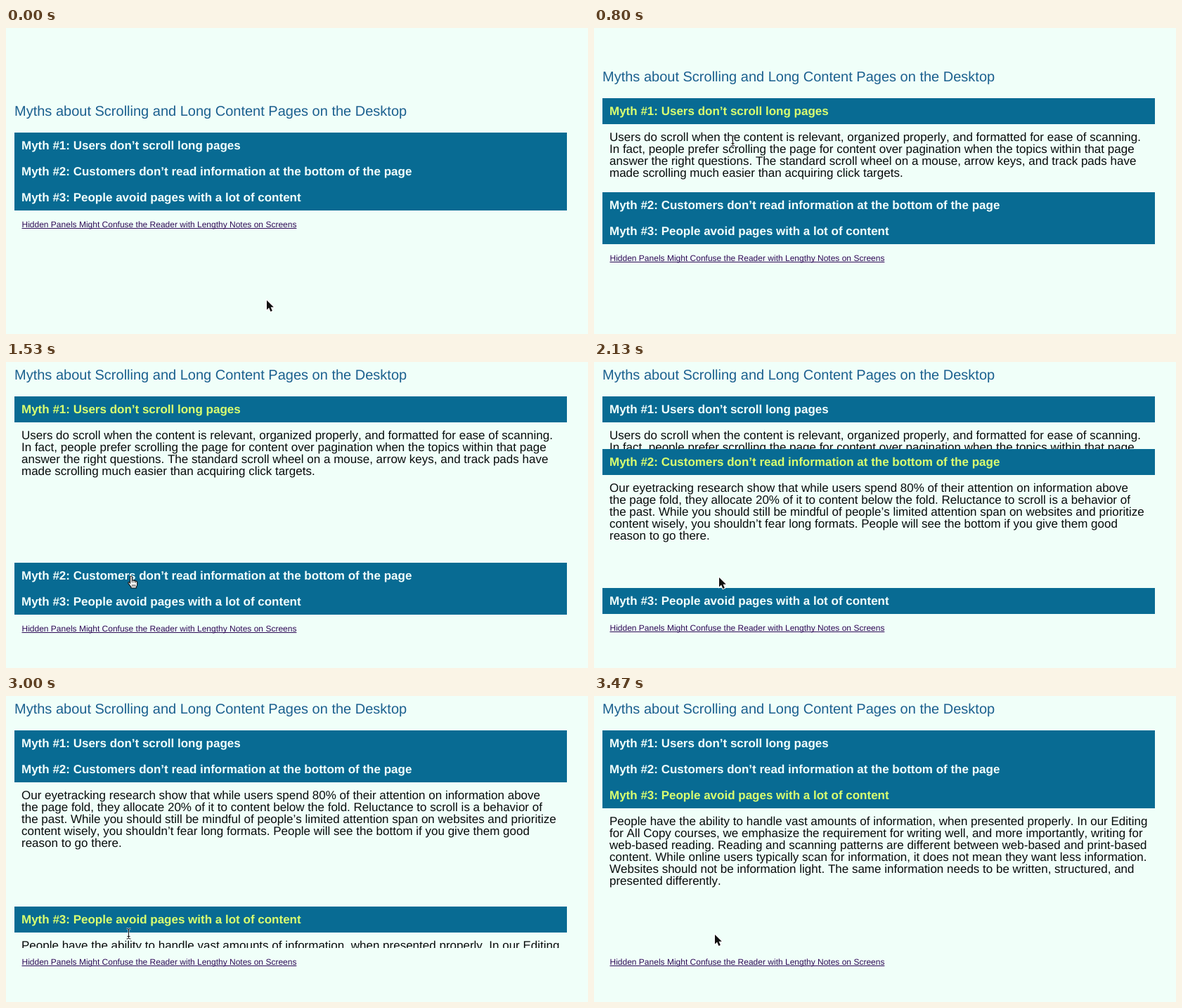
An HTML page with a canvas that plays this animation: 828 px wide and 436 px high, repeating every 3.54 s.

```html
<!DOCTYPE html>
<html lang="en">
<head>
<meta charset="utf-8">
<title>Accordion</title>
<style>
  html, body { margin: 0; width: 100%; height: 100%; overflow: hidden; background: #f0fff9; }
  canvas { display: block; }
</style>
</head>
<body>
<canvas id="stage" width="828" height="436"></canvas>
<script>
const ctx = document.getElementById('stage').getContext('2d');
const LOOP = 3540, STEP = 200 / 3, LAST_STEP = 52;
const FAMILY = '"Liberation Sans", Arial, sans-serif';
const COLORS = {
  page: '#f0fff9', bar: '#086b93', heading: '#1b608f', tab: '#f2fffc',
  openTab: '#d9ff70', body: '#080c0c', link: '#2f0b57'
};
const BAR = { x: 12, width: 786, height: 37 };
const TEXT_X = 22, LINE = 17, PANEL = 200;
const OPEN_TIME = 500;

const heading = 'Myths about Scrolling and Long Content Pages on the Desktop';
const link = 'Hidden Panels Might Confuse the Reader with Lengthy Notes on Screens';

const sections = [
  {
    opensAt: 658,
    title: 'Myth #1: Users don’t scroll long pages',
    lines: [
      'Users do scroll when the content is relevant, organized properly, and formatted for ease of scanning.',
      'In fact, people prefer scrolling the page for content over pagination when the topics within that page',
      'answer the right questions. The standard scroll wheel on a mouse, arrow keys, and track pads have',
      'made scrolling much easier than acquiring click targets.'
    ]
  },
  {
    opensAt: 1853,
    title: 'Myth #2: Customers don’t read information at the bottom of the page',
    lines: [
      'Our eyetracking research show that while users spend 80% of their attention on information above',
      'the page fold, they allocate 20% of it to content below the fold. Reluctance to scroll is a behavior of',
      'the past. While you should still be mindful of people’s limited attention span on websites and prioritize',
      'content wisely, you shouldn’t fear long formats. People will see the bottom if you give them good',
      'reason to go there.'
    ]
  },
  {
    opensAt: 2971,
    title: 'Myth #3: People avoid pages with a lot of content',
    lines: [
      'People have the ability to handle vast amounts of information, when presented properly. In our Editing',
      'for All Copy courses, we emphasize the requirement for writing well, and more importantly, writing for',
      'web-based reading. Reading and scanning patterns are different between web-based and print-based',
      'content. While online users typically scan for information, it does not mean they want less information.',
      'Websites should not be information light. The same information needs to be written, structured, and',
      'presented differently.'
    ]
  }
];

// Pointer stops: time, x, y
const stops = [
  [70, 371, 388], [530, 197, 161], [1090, 197, 161], [1490, 178, 307],
  [2230, 178, 307], [2480, 174, 339], [3050, 174, 339], [3300, 172, 340]
];

const clamp = v => Math.min(1, Math.max(0, v));
const smooth = v => v * v * (3 - 2 * v);

function openness(section, time) {
  const p = clamp((time - section.opensAt) / OPEN_TIME);
  return p * (2 - p);
}

function pointerAt(time) {
  let i = 0;
  while (i < stops.length - 2 && time > stops[i + 1][0]) i++;
  const [t0, x0, y0] = stops[i], [t1, x1, y1] = stops[i + 1];
  const p = smooth(clamp((time - t0) / (t1 - t0)));
  return { x: Math.round(x0 + (x1 - x0) * p), y: Math.round(y0 + (y1 - y0) * p) };
}

// Each panel grows on opening and shrinks as the next one takes over.
function layout(time) {
  const shares = sections.map(s => openness(s, time));
  const heights = shares.map((share, i) => Math.floor(PANEL * (share - (shares[i + 1] || 0)) + 1e-6));
  const total = heights.reduce((a, b) => a + b, 0);
  const top = 149 - Math.ceil(total / 2);
  let y = top;
  const rows = sections.map((section, i) => {
    const row = {
      section, y, panelY: y + BAR.height, height: heights[i],
      open: shares[i] > 0 && !shares[i + 1]
    };
    y = row.panelY + row.height;
    return row;
  });
  return { top, rows, bottom: y };
}

function text(str, x, y, size, color, weight = 'normal') {
  ctx.font = `${weight} ${size}px ${FAMILY}`;
  ctx.fillStyle = color;
  ctx.fillText(str, x, y);
}

function drawRow({ section, y, panelY, height, open }) {
  ctx.fillStyle = COLORS.bar;
  ctx.fillRect(BAR.x, y, BAR.width, BAR.height);
  text(section.title, TEXT_X, y + 24, 17, open ? COLORS.openTab : COLORS.tab, 'bold');
  if (height <= 0) return;
  ctx.save();
  ctx.beginPath();
  ctx.rect(BAR.x, panelY, BAR.width, height);
  ctx.clip();
  section.lines.forEach((line, i) => text(line, TEXT_X, panelY + 24 + i * LINE, 17, COLORS.body));
  ctx.restore();
}

function drawLink(bottom) {
  text(link, TEXT_X + 0.5, bottom + 24, 12, COLORS.link);
  ctx.fillRect(TEXT_X + 0.5, bottom + 25, ctx.measureText(link).width, 1);
}

function cursorKind({ x, y }, { rows, bottom }) {
  for (const row of rows) {
    if (y >= row.y && y < row.panelY) return 'hand';
    const textHeight = Math.min(row.height, 12 + row.section.lines.length * LINE);
    if (y >= row.panelY && y < row.panelY + textHeight) return 'beam';
  }
  const overLink = x < 414 && y >= bottom + 13 && y < bottom + 27;
  return overLink ? 'hand' : 'arrow';
}

const arrow = new Path2D('M0 0V13.5L3.1 10.6L5.4 16L7.9 15L5.6 9.7H9.8Z');
const hand = new Path2D('M-1.4 8V-0.6Q-1.4 -2 0 -2Q1.4 -2 1.4 -0.6V4.2Q2.6 3 4 4.6' +
  'Q5.4 3.8 6.4 5.4Q8.6 5 8.6 7V10Q8.6 12 7.3 13.4V15H0V13.6L-4 8.4' +
  'Q-4.6 7 -3.3 6.6Q-2.3 6.6 -1.4 8Z');
const knuckles = new Path2D('M1.4 4V7.4M4 5V7.6M6.4 5.6V8M1.7 10V13M3.7 10V13M5.7 10V13');
const beam = new Path2D('M-2.5 -7.5H-1.5Q0.5 -7.5 0.5 -6V5.5Q0.5 7 -1.5 7H-2.5' +
  'M3.5 -7.5H2.5Q0.5 -7.5 0.5 -6M0.5 5.5Q0.5 7 2.5 7H3.5M-1.5 3.5H2.5');

function stroke(path, color, width) {
  ctx.strokeStyle = color;
  ctx.lineWidth = width;
  ctx.stroke(path);
}

function fill(path, color) {
  ctx.fillStyle = color;
  ctx.fill(path);
}

const cursors = {
  arrow() { stroke(arrow, '#fff', 2); fill(arrow, '#111'); },
  hand() { fill(hand, '#fff'); stroke(hand, '#111', 1.1); stroke(knuckles, '#111', 0.8); },
  beam() { stroke(beam, 'rgba(255,255,255,.7)', 2.4); stroke(beam, '#111', 1); }
};

function draw(time) {
  const page = layout(time), pointer = pointerAt(time);
  ctx.fillStyle = COLORS.page;
  ctx.fillRect(0, 0, 828, 436);
  ctx.fontKerning = 'none';
  ctx.textRendering = 'geometricPrecision';
  text(heading, 12, page.top - 24, 20, COLORS.heading);
  page.rows.forEach(drawRow);
  drawLink(page.bottom);
  ctx.save();
  ctx.translate(pointer.x, pointer.y);
  cursors[cursorKind(pointer, page)]();
  ctx.restore();
}

let start;
function tick(now) {
  start ??= now;
  const elapsed = (now - start) % LOOP;
  draw(Math.min(LAST_STEP, Math.floor((elapsed + 4) / STEP)) * STEP);
  requestAnimationFrame(tick);
}
draw(0);
requestAnimationFrame(tick);
</script>
</body>
</html>
```
